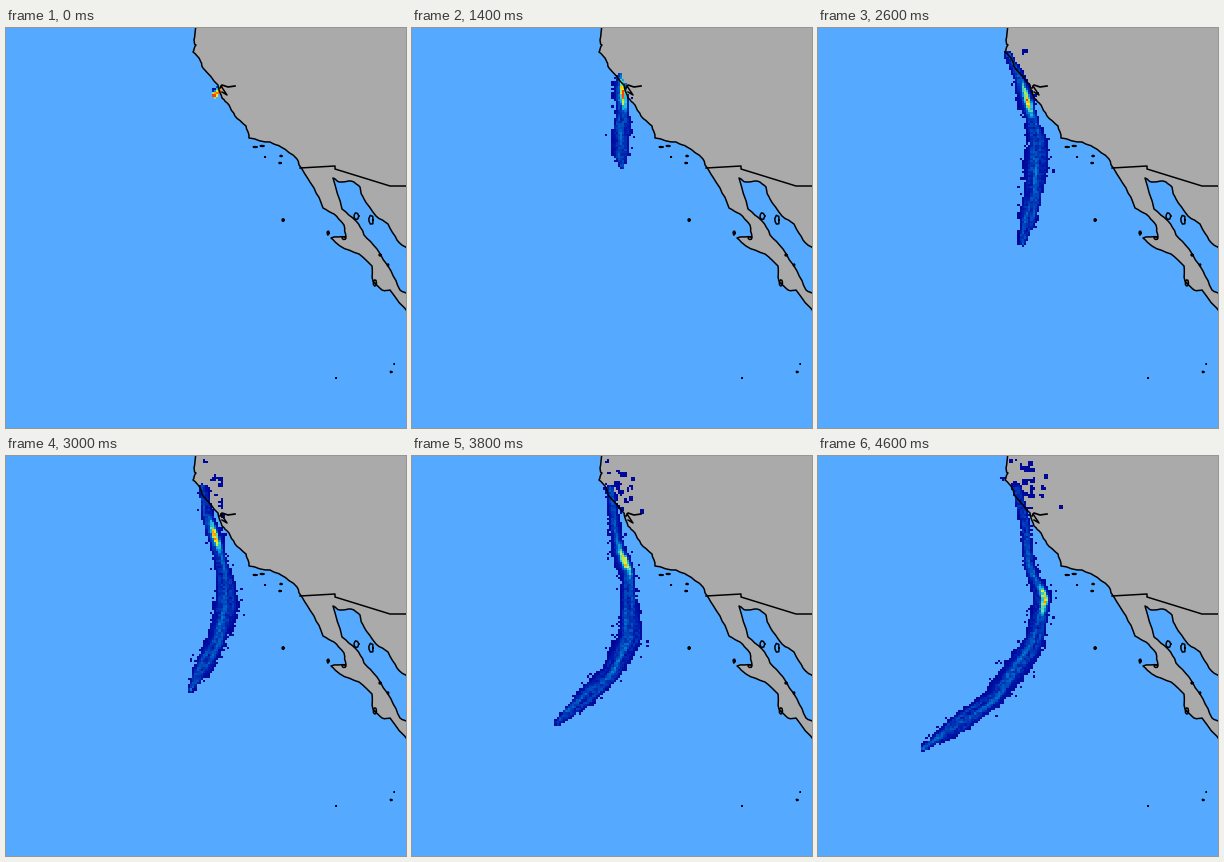
Write a matplotlib script that moves like this. It is 400 by 400 pixels and loops after 4800 ms.

```python
import numpy as np
import matplotlib.pyplot as plt
from matplotlib.animation import FuncAnimation
from matplotlib.colors import LinearSegmentedColormap

SIZE, FRAMES, STEP = 400, 24, 200
SEA, LAND = "#55aaff", "#aaaaaa"
CELL, X0, Y0 = 2.18, 90.3, -0.3
NX, NY = 96, 137

heat = LinearSegmentedColormap.from_list("heat", [
    "#000090", "#0014a8", "#0064c8", "#18b0e8",
    "#66e0a8", "#f0f020", "#ffaa00", "#ff4000"])

fig = plt.figure(figsize=(4, 4), dpi=100, facecolor=SEA)
ax = fig.add_axes([0, 0, 1, 1])
ax.axis("off")


# ---- map ----
def rough(pts, seed):
    """Refine a few coast points into a wiggly shore."""
    rng = np.random.default_rng(seed)
    p = np.array(pts, float)
    for amp in (0.8, 0.6):
        mid = (p[1:] + p[:-1]) / 2
        mid += rng.uniform(-amp, amp, mid.shape)
        out = np.empty((2 * len(p) - 1, 2))
        out[::2], out[1::2] = p, mid
        p = out
    return p


def line(pts, width=1.5):
    ax.plot(*np.transpose(pts), color="black", lw=width * 0.72, zorder=3)


def area(pts, color):
    ax.fill(*np.transpose(pts), color=color, lw=0, zorder=1)


north = [(190, -3), (188, 12), (190, 17), (187, 24), (194, 32), (197, 40),
         (212, 57), (216, 70), (223, 77), (229, 88), (240, 98), (243, 110),
         (264, 114), (275, 119), (291, 131), (296, 141)]
south = [(296, 141), (308, 160), (317, 180), (328, 186), (338, 197),
         (340, 209), (325, 210), (334, 218), (353, 226), (366, 238),
         (367, 253), (376, 262), (384, 262), (403, 286)]
gulf = [(403, 267), (394, 262), (385, 243), (371, 221), (358, 207),
        (350, 193), (336, 181), (327, 150), (334, 154), (345, 153),
        (354, 159), (358, 171), (370, 188), (382, 196), (391, 212),
        (403, 222)]
coast = np.vstack([rough(north, 1), rough(south, 2)])
inlet = rough(gulf, 3)
area([*coast, (403, -3)], LAND)
area(inlet, SEA)
for shore in (coast, inlet):
    line(shore)
line([(294, 140), (329, 138), (329, 141), (384, 158), (403, 158)])
line([(214, 60), (216, 57), (222, 59), (229, 58)], 1.7)
line([(215, 58), (221, 67), (216, 64)])

rng = np.random.default_rng(5)
turn = np.linspace(0, 2 * np.pi, 8)
for x, y, w, h in [(350, 188, 2.5, 3.5), (365, 192, 2.5, 4),
                   (322, 205, 1, 2), (277, 192, .8, 1.5),
                   (249, 119, 1.8, .5), (256, 118, 1.8, .5),
                   (275, 128, 1, .6), (274, 135, 1, .6), (338, 210, 2, 1.5),
                   (369, 255, 1.5, 3), (374, 227, 1, 1), (382, 237, .6, 1),
                   (385, 344, .7, .7), (259, 129, .3, .3),
                   (330, 350, .2, .2), (388, 336, .1, .1)]:
    r = rng.uniform(.75, 1.2, 8)
    r[-1] = r[0]
    line(np.column_stack([x + w * r * np.cos(turn), y + h * r * np.sin(turn)]))


# ---- plume ----
def spread(pts, n=100):
    """Spread n points evenly along a path."""
    p = np.array(pts, float)
    s = np.r_[0, np.cumsum(np.hypot(*np.diff(p, axis=0).T))]
    t = np.linspace(0, s[-1], n)
    return np.column_stack([np.interp(t, s, c) for c in p.T])


# Course of the plume, from outlet to tip, at a few moments.
course = {
    0: [(213, 60), (211, 64), (206, 67)],
    4: [(211, 58), (205, 68), (195, 87), (195, 94), (197, 104)],
    9: [(204, 46), (208, 62), (218, 100), (217, 140), (219, 162)],
    13: [(190, 28), (201, 49), (208, 72), (220, 115), (216, 165),
         (204, 216)],
    17: [(203, 38), (200, 65), (216, 115), (222, 168), (206, 205),
         (166, 252)],
    21: [(192, 30), (204, 60), (205, 100), (217, 122), (214, 195),
         (192, 232), (126, 282)],
    23: [(199, 34), (208, 72), (211, 110), (225, 143), (216, 188),
         (176, 243), (106, 293)],
}
keys = list(course)
paths = np.array([spread(p) for p in course.values()])
u = np.linspace(0, 1, 100)
gx, gy = np.meshgrid(X0 + CELL * (np.arange(NX) + .5),
                     Y0 + CELL * (np.arange(NY) + .5))

# Specks drift inland from the outlet once the wind turns.
rng = np.random.default_rng(12)
SPECKS = 34
birth = np.sort(rng.uniform(11, 23, SPECKS))
start = rng.normal((204, 32), (9, 13), (SPECKS, 2))
drift = rng.normal((1.2, -1.2), (1.6, .8), (SPECKS, 2))
radius = rng.uniform(1.4, 3.2, SPECKS)


def bump(x, width):
    return np.exp(-(x / width) ** 2)


def plume(f):
    noise = np.random.default_rng(40 + f).random((NY, NX))
    path = np.array([[np.interp(f, keys, paths[:, i, k]) for k in (0, 1)]
                     for i in range(100)])
    hot_y = 66 + .4 * max(f - 9, 0) ** 2

    width = 4.5 + 6.5 * u + 4 * bump(u - .57, .12)
    width += 3 * bump(path[:, 1] - hot_y, 15)
    width *= min(1, .35 + f / 14) * np.minimum(1, .3 + 5 * (1 - u))

    dx, dy = gx[..., None] - path[:, 0], gy[..., None] - path[:, 1]
    dist = np.hypot(dx, dy)
    i = dist.argmin(axis=2)
    d = dist.min(axis=2) / width[i]
    tx, ty = np.gradient(path, axis=0).T
    side = (gx - path[i, 0]) * ty[i] - (gy - path[i, 1]) * tx[i]
    side /= np.hypot(tx, ty)[i]

    # Streaks run along the flow.
    wave = (np.sin(side * .9 + i * .11 + f) + np.sin(side * .5 - i * .17)) / 2
    mask = (d < .88 + .14 * wave + .28 * noise) | ((d < 1.6) & (noise > .95))
    value = .05 + np.clip(1 - d * d, 0, 1) * (.14 + .07 * wave + .1 * noise)

    lane = 1 + 3 * bump(f - 4, 4) + bump(f - 23, 4)
    across = bump(side - lane, 3.4)
    along = .72 * bump(gy - hot_y, 14) + .28 * bump(gy - hot_y, 34)
    glow = (1.02 - .009 * f) * across * along * (.75 + .4 * noise)
    value = np.maximum(value, glow)

    for (x, y), r in zip(start + drift * (f - birth)[:, None] * .6,
                         radius * (birth <= f)):
        speck = np.hypot(gx - x, gy - y) < r * (.8 + .4 * noise)
        value[speck & ~mask] = .06
        mask |= speck
    rgba = heat(np.clip(value, 0, 1))
    rgba[..., 3] = mask
    return rgba


smoke = ax.imshow(plume(0), extent=(X0, X0 + NX * CELL, Y0 + NY * CELL, Y0),
                  interpolation="nearest", aspect="auto", zorder=2)
ax.set_xlim(0, SIZE)
ax.set_ylim(SIZE, 0)


def update(f):
    smoke.set_data(plume(f))
    return [smoke]


anim = FuncAnimation(fig, update, frames=FRAMES, interval=STEP, repeat=True)
plt.show()
```
